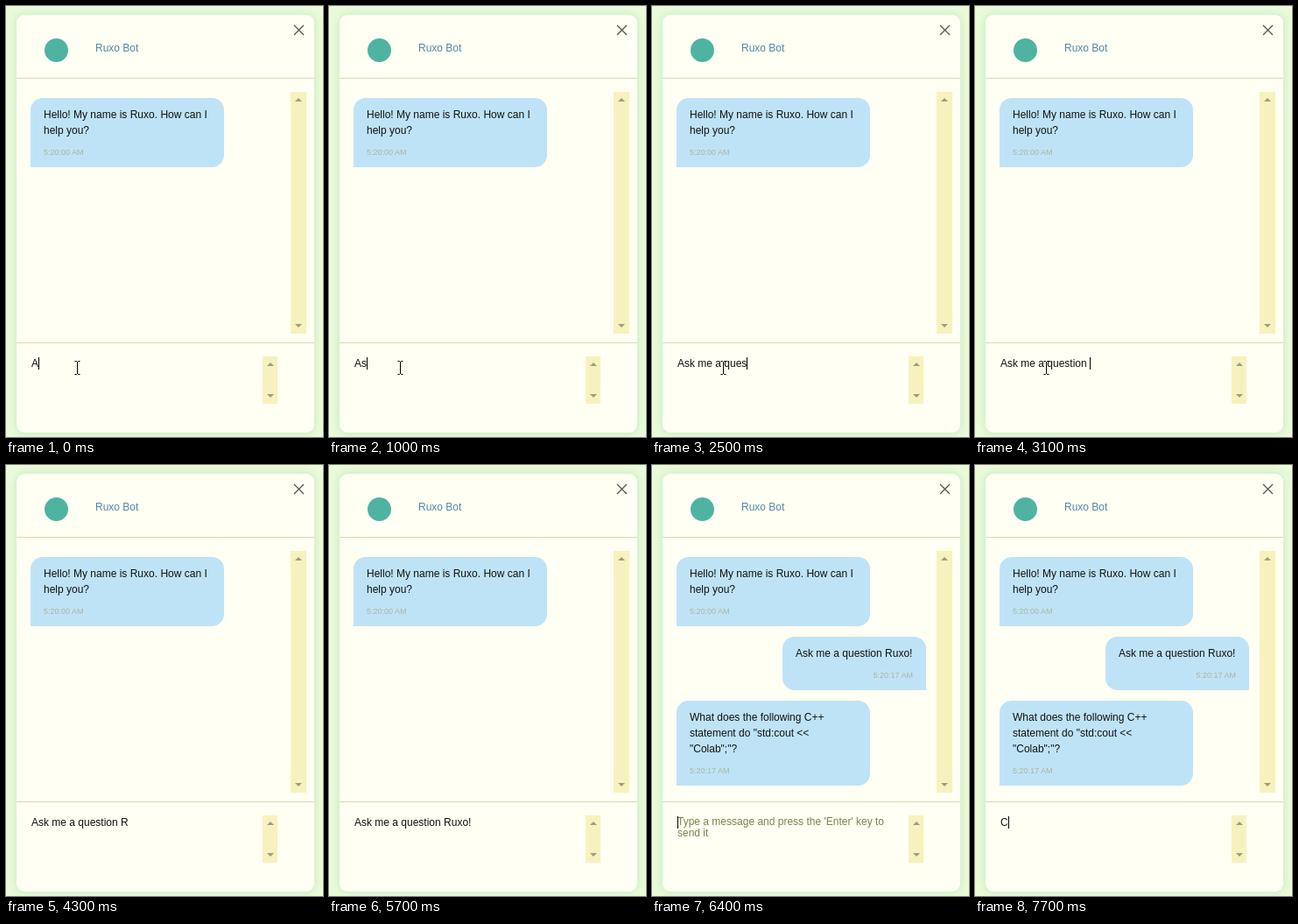
Recreate the animation shown at these times as an HTML page. Size 362x492 px, loop 8000 ms.

```html
<!DOCTYPE html>
<html lang="en">
<head>
<meta charset="utf-8">
<title>Chat window</title>
<style>
  html, body { margin: 0; width: 100%; height: 100%; overflow: hidden; }
  body {
    position: relative;
    background: #ebfad8;
    font: 12px/18px "Liberation Sans", Arial, sans-serif;
    color: #111;
  }
  body *, svg { position: absolute; box-sizing: border-box; }
  .panel {
    left: 12px; top: 10px; width: 340px; height: 477px;
    border-radius: 9px;
    background: #fffff3;
    box-shadow: 0 0 9px 1px #c3ecc6;
  }
  .rule { left: 12px; width: 340px; height: 1px; background: #dbdbb4; }
  .logo {
    left: 44px; top: 37px; width: 27px; height: 27px;
    border-radius: 50%; background: #4fb3a2;
  }
  .title { left: 102px; top: 39px; color: #5488a4; white-space: pre; }
  .bar { background: #f7f2bd; }
  .bar::before, .bar::after {
    content: ""; position: absolute; left: calc(50% - 4px);
    border: 4px solid transparent;
  }
  .bar::before { top: 3px; border-bottom-color: #9c9c80; }
  .bar::after { bottom: 3px; border-top-color: #9c9c80; }

  .bubble {
    left: 28px; width: 221px;
    padding: 10px 15px 12px;
    border-radius: 14px 14px 14px 0;
    background: #bfe3f6;
    white-space: pre;
  }
  .bubble.user { left: 149px; width: 164px; border-radius: 14px 14px 0 14px; }
  .bubble time {
    position: static; display: block; margin-top: 11px;
    font-size: 9px; line-height: 10px; color: #aab3a0;
  }
  .user time { text-align: right; }
  .typing { width: 25px; height: 49px; padding: 0; border-radius: 10px 10px 10px 0; }
  .typing i {
    top: 22px; width: 3px; height: 3px;
    border-radius: 50%; background: #87a0ae;
  }
  .typing i.on { background: #2f3d46; }

  .input { left: 29px; top: 401px; line-height: 14px; white-space: pre; }
  .input span { position: static; }
  #hint { left: 29px; top: 401px; line-height: 13px; color: #80804e; white-space: pre; }
  #caret {
    position: static; display: inline-block; vertical-align: -3px;
    width: 1px; height: 14px; margin-right: -1px; background: #000;
  }
  [hidden] { display: none !important; }
</style>
</head>
<body>
<div class="panel"></div>
<div class="logo"></div>
<div class="title">Ruxo Bot</div>
<svg style="left:328px;top:21px" width="13" height="13" stroke="#555" stroke-width="1.3">
  <path d="M1 1L12 12M12 1L1 12"/>
</svg>
<div class="rule" style="top:82px"></div>
<div class="rule" style="top:384px"></div>
<div class="bar" style="left:325px;top:98px;width:18px;height:276px"></div>
<div class="bar" style="left:293px;top:400px;width:17px;height:54px"></div>

<div class="bubble" style="top:105px">Hello! My name is Ruxo. How can I
help you?<time>5:20:00 AM</time></div>
<div class="bubble user" id="sent" style="top:196px" hidden>Ask me a question Ruxo!<time>5:20:17 AM</time></div>
<div class="bubble typing" id="wait" style="top:269px" hidden>
  <i style="left:7px"></i><i style="left:11px"></i><i style="left:16px"></i>
</div>
<div class="bubble" id="reply" style="top:269px" hidden>What does the following C++
statement do "std:cout &lt;&lt;
"Colab";"?<time>5:20:17 AM</time></div>

<div id="hint" hidden>Type a message and press the 'Enter' key to
send it</div>
<div class="input"><span id="typed">A</span><span id="caret"></span></div>
<svg id="mouse" style="left:78px;top:405px" width="8" height="16" fill="none" stroke="#000">
  <path d="M0.5 0.5H2.5L3.5 1.5L4.5 0.5H6.5M3.5 1V15M0.5 15.5H2.5L3.5 14.5L4.5 15.5H6.5"/>
</svg>

<script>
const LOOP = 8000, BLINK = 500;
const SEND = 6100, REPLY = 6400, ANSWER = 7700, MOUSE_HIDE = 3200;
const QUESTION = "Ask me a question Ruxo!";
// Time of each keystroke of the question
const KEYS = [
  100, 1000, 1200, 1300, 1400, 1500, 1700, 1800, 2000,
  2200, 2300, 2400, 2500, 2600, 2700, 2900, 2900, 3100,
  3800, 4700, 4800, 4900, 5200
];
const el = id => document.getElementById(id);
const [sent, wait, reply, hint, typed, caret, mouse] =
  ["sent", "wait", "reply", "hint", "typed", "caret", "mouse"].map(el);
const dots = [...wait.children];
const show = (node, on) => node.toggleAttribute("hidden", !on);

function inputAt(t) {
  if (t >= ANSWER) return ["C", ANSWER];
  if (t >= SEND) return ["", SEND];
  const n = Math.max(1, KEYS.filter(k => k <= t).length);
  return [QUESTION.slice(0, n), KEYS[n - 1]];
}

function draw(t) {
  const [text, lastKey] = inputAt(t);
  if (typed.textContent !== text) typed.textContent = text;
  const phase = Math.floor(Math.max(0, t - lastKey) / BLINK);
  caret.style.visibility = phase % 2 ? "hidden" : "visible";

  show(sent, t >= SEND);
  show(wait, t >= SEND && t < REPLY);
  show(reply, t >= REPLY);
  show(hint, t >= SEND && t < ANSWER);
  show(mouse, t < MOUSE_HIDE);

  const active = Math.floor((t - SEND) / 100) % 3;
  dots.forEach((dot, i) => dot.classList.toggle("on", i === active));
}

const start = performance.now();
function tick() {
  draw((performance.now() - start) % LOOP);
  requestAnimationFrame(tick);
}
tick();
</script>
</body>
</html>
```
